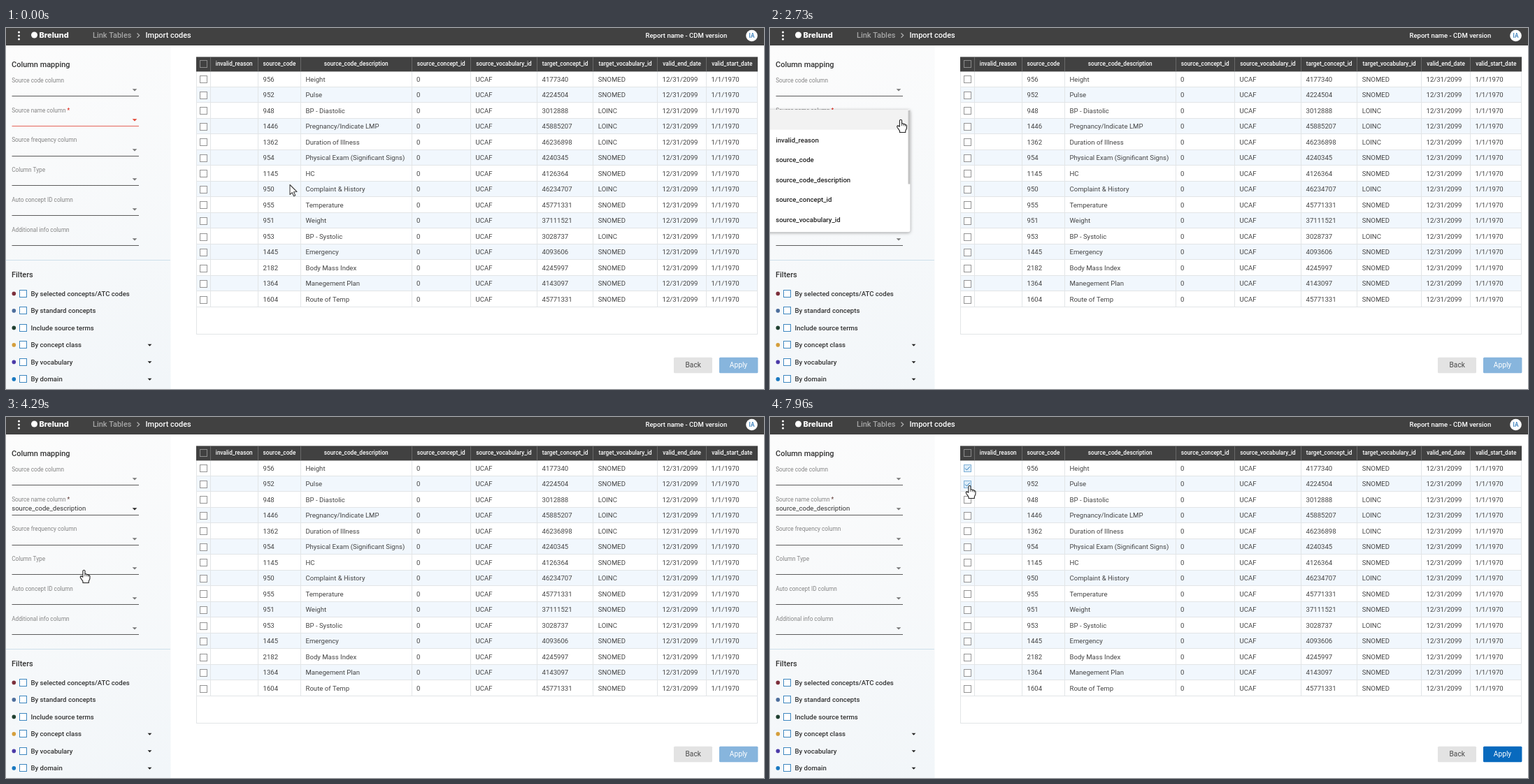
An HTML page with a canvas for the animation above (8000 ms loop, 1084 by 517 pixels).

```html
<!DOCTYPE html>
<html lang="en">
<head>
<meta charset="utf-8">
<title>Import codes</title>
<style>
html, body { margin: 0; width: 100%; height: 100%; overflow: hidden; background: #fff; }
canvas { display: block; width: 1084px; height: 517px; }
</style>
</head>
<body>
<canvas id="stage"></canvas>
<script>
const W = 1084, H = 517, LOOP = 8000;
const canvas = document.getElementById('stage');
const ctx = canvas.getContext('2d');
const dpr = window.devicePixelRatio || 1;
canvas.width = W * dpr;
canvas.height = H * dpr;

const SMALL = 8.22, BODY = 9.59, TITLE = 10.96;
const clamp = v => Math.max(0, Math.min(1, v));
const progress = (t, a, b) => clamp((t - a) / (b - a));
const smooth = p => p * p * (3 - 2 * p);

function rect(x, y, w, h, color) {
  ctx.fillStyle = color;
  ctx.fillRect(x, y, w, h);
}
function box(x, y, size, border, fill) {
  rect(x, y, size, size, border);
  rect(x + 1, y + 1, size - 2, size - 2, fill);
}
function disc(x, y, r, color) {
  ctx.fillStyle = color;
  ctx.beginPath();
  ctx.arc(x, y, r, 0, 7);
  ctx.fill();
}
function shape(points, fill) {
  ctx.beginPath();
  points.forEach(([x, y]) => ctx.lineTo(x, y));
  ctx.closePath();
  ctx.fillStyle = fill;
  ctx.fill();
}
function line(points, color, width) {
  ctx.beginPath();
  points.forEach(([x, y]) => ctx.lineTo(x, y));
  ctx.strokeStyle = color;
  ctx.lineWidth = width;
  ctx.stroke();
}
// y is the middle of the capitals
function text(s, x, y, size, color, weight = 400, align = 'left', family = 'Roboto') {
  ctx.font = `${weight} ${size}px ${family}, sans-serif`;
  ctx.textAlign = align;
  ctx.fillStyle = color;
  ctx.fillText(s, x, y + size * 0.355);
}
function caret(x, y, color, r = 3.3) {
  shape([[x - r, y - r / 2], [x + r, y - r / 2], [x, y + r / 2]], color);
}
function roundBox(x, y, w, h, r, color) {
  ctx.fillStyle = color;
  ctx.beginPath();
  ctx.roundRect(x, y, w, h, r);
  ctx.fill();
}

const columns = [
  ['invalid_reason', 292], ['source_code', 360.5], ['source_code_description', 421.5],
  ['source_concept_id', 580], ['source_vocabulary_id', 664.5], ['target_concept_id', 759.5],
  ['target_vocabulary_id', 839.8], ['valid_end_date', 931.5], ['valid_start_date', 1001.5]
];
const rows = [
  ['956', 'Height', '4177340', 'SNOMED'],
  ['952', 'Pulse', '4224504', 'SNOMED'],
  ['948', 'BP - Diastolic', '3012888', 'LOINC'],
  ['1446', 'Pregnancy/Indicate LMP', '45885207', 'LOINC'],
  ['1362', 'Duration of Illness', '46236898', 'LOINC'],
  ['954', 'Physical Exam (Significant Signs)', '4240345', 'SNOMED'],
  ['1145', 'HC', '4126364', 'SNOMED'],
  ['950', 'Complaint & History', '46234707', 'LOINC'],
  ['955', 'Temperature', '45771331', 'SNOMED'],
  ['951', 'Weight', '37111521', 'SNOMED'],
  ['953', 'BP - Systolic', '3028737', 'LOINC'],
  ['1445', 'Emergency', '4093606', 'SNOMED'],
  ['2182', 'Body Mass Index', '4245997', 'SNOMED'],
  ['1364', 'Manegement Plan', '4143097', 'SNOMED'],
  ['1604', 'Route of Temp', '45771331', 'SNOMED']
];
const fields = ['Source code column', 'Source name column', 'Source frequency column',
  'Column Type', 'Auto concept ID column', 'Additional info column'];
const filters = [
  ['By selected concepts/ATC codes', '#7c2f3b'], ['By standard concepts', '#4d6e9c'],
  ['Include source terms', '#1f4030'], ['By concept class', '#d59f3c'],
  ['By vocabulary', '#4b3aa8'], ['By domain', '#1878c0']
];
const options = ['', 'invalid_reason', 'source_code', 'source_code_description',
  'source_concept_id', 'source_vocabulary_id'];

// start, end, from, bend, to
const moves = [
  [1170, 1980, [406, 224.5], [225, 66], [182, 129]],
  [1980, 2030, [182, 129], [184, 130], [185.5, 131]],
  [2420, 2540, [185.5, 131], [186, 131], [187, 131]],
  [3220, 3730, [187, 131], [155, 175], [111.5, 219]],
  [4590, 5040, [111.5, 219], [220, 227], [338, 222]],
  [5180, 5230, [338, 222], [345, 220], [351, 219]],
  [5230, 5940, [351, 219], [480, 215], [261, 74]],
  [6050, 6240, [261, 74], [270, 75], [280, 74.5]],
  [6840, 7100, [280, 74.5], [281, 86], [284, 97]],
  [7950, 7960, [284, 97], [284.5, 97.5], [285.5, 98]]
];
function pointer(t) {
  let move = moves[0];
  for (const m of moves) if (t >= m[0]) move = m;
  const [start, end, a, b, c] = move;
  const s = smooth(progress(t, start, end)), q = 1 - s;
  return [0, 1].map(i => q * q * a[i] + 2 * q * s * b[i] + s * s * c[i]);
}

function drawHeader() {
  rect(0, 0, W, 25, '#414141');
  [6, 11, 16].forEach(y => disc(18.5, y, 1.5, '#fff'));
  disc(40.5, 10, 4.5, '#fff');
  text('Brelund', 47.5, 10, 11, '#fff', 800, 'left', 'Inter');
  text('Link Tables', 124, 10.5, TITLE, '#a5a5a5', 500);
  line([[187.5, 7.5], [190.7, 10.6], [187.5, 13.7]], '#b5b5b5', 1.2);
  text('Import codes', 199.5, 10.5, TITLE, '#fff', 500);
  text('Report name - CDM version', 914.5, 10.8, 9.5, '#fff', 500);
  disc(1066.5, 11, 8.3, '#fff');
  text('IA', 1066.5, 11.2, 8.2, '#2a74b5', 500, 'center');
}

function drawFields(t) {
  const picked = t >= 4190;
  text('Column mapping', 8, 52, TITLE, '#333', 500);
  fields.forEach((name, i) => {
    const y = 75 + i * 42.75;
    const required = i === 1, invalid = required && !picked;
    const base = Math.floor(75 + i * 42.8 + 22.6);
    text(name, 8.2, y, SMALL, '#858585');
    if (required) {
      const end = 8.2 + ctx.measureText(name + ' ').width;
      text('*', end, y, SMALL, picked ? '#6b4a45' : '#e0291c', 500);
    }
    rect(8.5, base, 181.5, 1, invalid ? '#e5655a' : '#5c5c5c');
    let arrow = '#777';
    if (invalid) arrow = '#e2402f';
    else if (required && t < 6700) arrow = '#222';
    caret(184, base - 8.2, arrow);
    if (required && picked) text(options[3], 8.2, y + 13.3, BODY, '#333');
  });
}

function drawFilters() {
  rect(0, 332, 235, 1, '#cddfeb');
  text('Filters', 8, 353, TITLE, '#333', 500);
  filters.forEach(([name, color], i) => {
    const y = 380.4 + i * 24.5;
    disc(11.3, y, 2.8, color);
    box(19, Math.round(y - 5.5), 11, '#3f88c0', '#fff');
    text(name, 35.5, y, BODY, '#333', 500);
    if (i > 2) caret(205.5, y + 0.4, '#222', 2.9);
  });
}

function drawTable(t) {
  const right = 1075, bodyTop = 62, pitch = 22.53;
  const edge = i => Math.round(bodyTop + pitch * i);
  rows.forEach((row, i) => {
    const top = edge(i), y = 73.2 + i * pitch;
    if (i % 2) rect(272, top, right - 272, edge(i + 1) - top, '#f1f7fd');
    rect(272, edge(i + 1) - 1, right - 272, 1, '#e2e5e7');
    const cells = ['', row[0], row[1], '0', 'UCAF', row[2], row[3], '12/31/2099', '1/1/1970'];
    cells.forEach((s, c) => text(s, columns[c][1] + 7, y, BODY, '#444'));
  });
  columns.forEach(([, x]) => rect(Math.floor(x), bodyTop, 1, edge(15) - bodyTop, '#e2e5e7'));
  rect(272, bodyTop, 1, 377, '#e2e5e7');
  rect(right - 1, bodyTop, 1, 377, '#e2e5e7');
  rect(272, 438, right - 272, 1, '#e2e5e7');

  rect(272, 41.4, right - 272, 21, '#414141');
  columns.forEach(([name, x], i) => {
    const next = i < 8 ? columns[i + 1][1] : right;
    rect(Math.floor(x), 42, 1, 20, '#686868');
    text(name, (x + next) / 2, 51.5, SMALL, '#fff', 500, 'center');
  });
  box(277, 46, 11, '#8b8b8b', '#414141');

  rows.forEach((row, i) => {
    const y = Math.round(68.2 + i * pitch);
    const checked = (i === 0 && t >= 6700) || (i === 1 && t >= 7710);
    box(277, y, 11, checked ? '#7fb0d6' : '#959595', checked ? '#dcecf8' : '#fff');
    if (checked) line([[279, y + 5.5], [281.4, y + 7.9], [285.8, y + 3.2]], '#2a78b8', 1);
  });
}

function drawButtons(t) {
  const top = 471.7, height = 22.6;
  roundBox(955, top, 55, height, 1.5, '#e3e3e3');
  text('Back', 982.7, 482.5, 10.2, '#4a4a4a', 400, 'center');
  const p = progress(t, 6700, 6860);
  const mix = (a, b) => Math.round(a + (b - a) * p);
  roundBox(1020, top, 55.4, height, 1.5, `rgb(${mix(135, 8)},${mix(181, 106)},${mix(221, 190)})`);
  text('Apply', 1047.5, 482.5, 10.2, '#fff', 400, 'center');
}

function drawPanel(t, cursorY) {
  const open = smooth(progress(t, 2500, 2730));
  const alpha = open * (1 - progress(t, 4150, 4290));
  if (t < 2540 || alpha <= 0) return;
  const top = 117, pitch = 28.6, origin = 131;
  ctx.save();
  ctx.globalAlpha = alpha;
  ctx.translate(0, origin);
  ctx.scale(1, 0.8 + 0.2 * open);
  ctx.translate(0, -origin);
  ctx.shadowColor = 'rgba(0,0,0,.38)';
  ctx.shadowBlur = 4 * dpr;
  ctx.shadowOffsetY = dpr;
  roundBox(-8, top, 208.5, 175.3, 3, '#fff');
  ctx.shadowColor = 'transparent';
  rect(0, top, 197.5, pitch, '#f2f2f2');
  const hover = Math.floor((cursorY - top) / pitch);
  if (hover > 0) rect(0, top + hover * pitch, 197.5, pitch, '#f6f6f6');
  if (t >= 4090) {
    const r = 115 * (1 - Math.pow(1 - progress(t, 4080, 4305), 4));
    ctx.save();
    ctx.beginPath();
    ctx.rect(0, top + 3 * pitch, 197.5, pitch);
    ctx.clip();
    disc(110, 217.5, r, 'rgba(0,0,0,.11)');
    ctx.restore();
  }
  options.forEach((s, i) => text(s, 8.2, 131.6 + i * pitch, BODY, '#222', 500));
  rect(197.5, top + 1, 3, 105.5, '#c2c2c2');
  ctx.restore();
}

const arrowShape = [[0, 0], [0, 14], [3.2, 11.1], [5.6, 16.3], [7.8, 15.3], [5.5, 10.3], [10, 10]];
function drawHand() {
  ctx.beginPath();
  ctx.moveTo(-1.6, 10.5);
  ctx.lineTo(-1.6, 1.6);
  ctx.quadraticCurveTo(-1.4, 0.3, 0, 0.3);
  ctx.quadraticCurveTo(1.4, 0.3, 1.5, 1.6);
  ctx.lineTo(1.5, 6);
  ctx.quadraticCurveTo(3.4, 5.2, 4.2, 6.7);
  ctx.quadraticCurveTo(5.9, 6, 6.5, 7.6);
  ctx.quadraticCurveTo(8.4, 7.4, 8.5, 9.2);
  ctx.lineTo(8.4, 12.8);
  ctx.lineTo(6.8, 16.2);
  ctx.lineTo(6.8, 18.5);
  ctx.lineTo(-1.5, 18.5);
  ctx.lineTo(-1.5, 16.4);
  ctx.lineTo(-5, 11.2);
  ctx.quadraticCurveTo(-5.8, 9.3, -4.2, 8.9);
  ctx.quadraticCurveTo(-2.9, 9, -1.6, 10.5);
  ctx.fillStyle = '#fff';
  ctx.fill();
  ctx.strokeStyle = '#222';
  ctx.stroke();
  line([[1.5, 6], [1.5, 9.2]], '#222', 0.8);
  line([[4.2, 6.7], [4.2, 9.3]], '#222', 0.8);
  line([[6.5, 7.6], [6.5, 9.8]], '#222', 0.8);
}
function drawCursor(t, x, y) {
  const click = [[2420, 2540], [3970, 4090], [6590, 6700]].some(([a, b]) => t >= a && t < b);
  if (click) disc(x, y, 10.5, 'rgba(255,246,0,.72)');
  const hand = (t >= 2030 && t < 5040 && x < 190) || t >= 6150;
  ctx.save();
  ctx.translate(x, y);
  ctx.lineWidth = 1.1;
  ctx.lineJoin = 'round';
  if (hand) drawHand();
  else {
    shape(arrowShape, '#fff');
    ctx.strokeStyle = '#444';
    ctx.stroke();
  }
  ctx.restore();
}

const panelFill = ctx.createLinearGradient(0, 25, 200, 517);
panelFill.addColorStop(0, '#fcfcfc');
panelFill.addColorStop(1, '#f2f6f9');

function draw(t) {
  const [x, y] = pointer(t);
  ctx.setTransform(dpr, 0, 0, dpr, 0, 0);
  rect(0, 0, W, H, '#fff');
  rect(0, 25, 235.5, H - 25, panelFill);
  drawHeader();
  drawFields(t);
  drawFilters();
  drawTable(t);
  drawButtons(t);
  drawPanel(t, y);
  drawCursor(t, x, y);
}

const began = performance.now();
function tick() {
  draw((performance.now() - began) % LOOP);
  requestAnimationFrame(tick);
}
tick();
</script>
</body>
</html>
```
